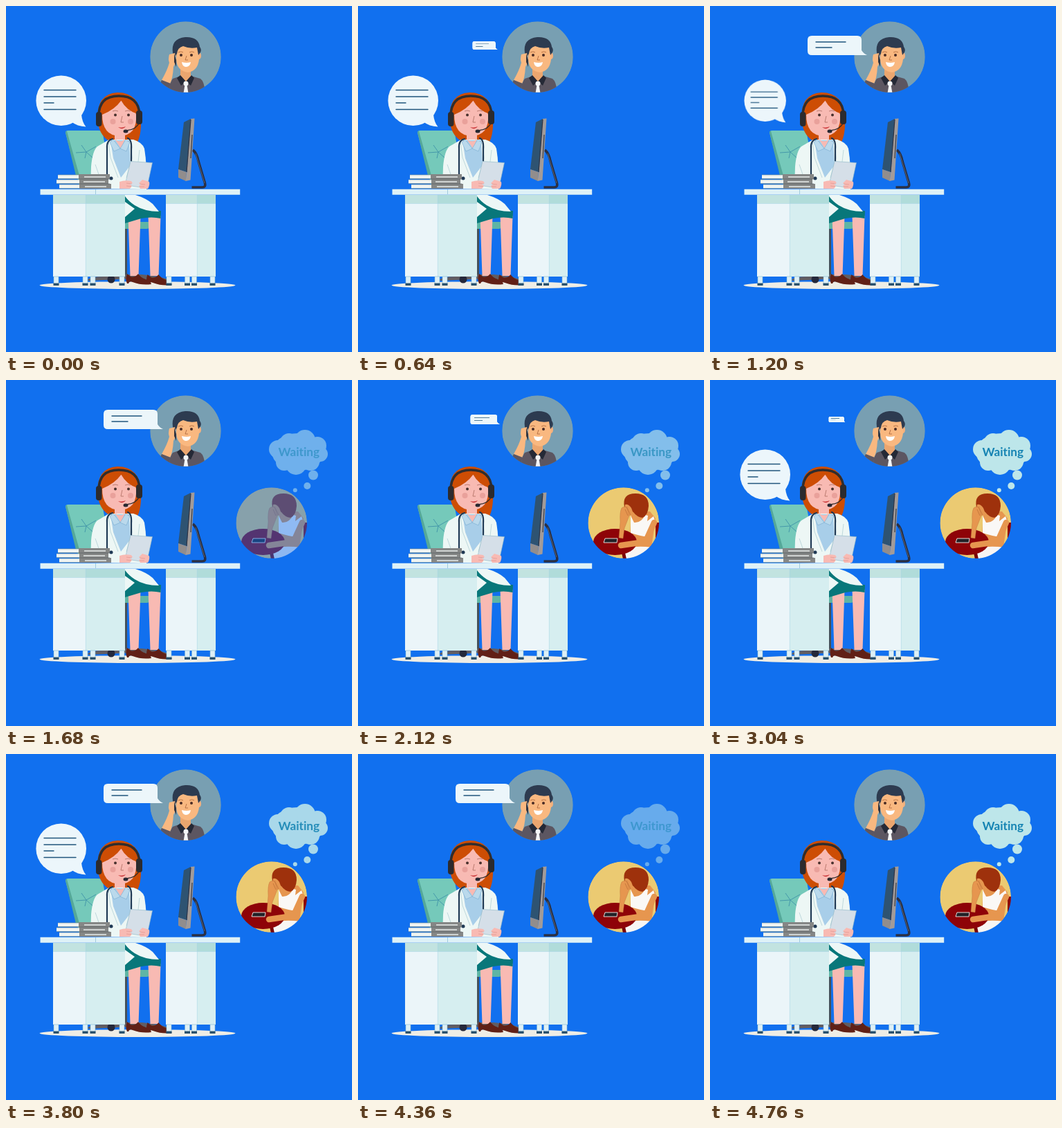
An HTML page for the animation above (4840 ms loop, 500 px wide and 500 px high).

```html
<!DOCTYPE html>
<html lang="en">
<head>
<meta charset="utf-8">
<title>Online consultation</title>
<style>
  html, body { margin: 0; width: 100%; height: 100%; overflow: hidden; background: #1170ef; }
  svg { display: block; width: 100vw; height: 100vh; }
  .anim { animation: 4840ms infinite; }
  #reply { transform-origin: 183.5px 57px; animation-name: reply; }
  #speech { transform-origin: 79.5px 137px; animation-name: speech; }
  #patient { animation-name: patient; }
  .thought { animation-name: thought; }
  .skin { fill: #f8bab3; }
  .ink { fill: none; stroke: #20557c; stroke-width: 1.4; stroke-linecap: round; }
  text { font: 700 17.2px Lato, sans-serif; font-variant-ligatures: none; fill: #1684b3; }

  @keyframes reply {
    0% { transform: scale(0); }
    10.744% { transform: scale(0); animation-timing-function: steps(7); }
    16.529% { transform: scale(1); }
    41.322% { transform: scale(1); animation-timing-function: steps(6); }
    46.281% { transform: scale(0); }
    61.157% { transform: scale(0); animation-timing-function: steps(7); }
    66.942% { transform: scale(1); }
    93.388% { transform: scale(1); animation-timing-function: steps(6); }
    98.347%, 100% { transform: scale(0); }
  }
  @keyframes speech {
    0% { transform: scale(1); }
    23.967% { transform: scale(1); animation-timing-function: steps(6); }
    28.926% { transform: scale(0); }
    46.281% { transform: scale(0); animation-timing-function: steps(6); }
    51.24% { transform: scale(1); }
    79.339% { transform: scale(1); animation-timing-function: steps(6); }
    84.298%, 100% { transform: scale(0); }
  }
  @keyframes patient {
    0% { opacity: 0; }
    29.752% { opacity: 0; animation-timing-function: steps(11); }
    38.843%, 100% { opacity: 1; }
  }
  @keyframes thought {
    0% { opacity: 0; }
    29.752% { opacity: 0; animation-timing-function: steps(11); }
    38.843% { opacity: 1; }
    41.322% { opacity: 1; animation-timing-function: steps(9); }
    48.76% { opacity: 0; animation-timing-function: steps(12); }
    58.678% { opacity: 1; }
    77.686% { opacity: 1; animation-timing-function: steps(9); }
    85.124% { opacity: 0; animation-timing-function: steps(12); }
    95.041%, 100% { opacity: 1; }
  }
</style>
</head>
<body>
<svg viewBox="0 0 500 500">
  <defs>
    <clipPath id="callerClip"><circle cx="259.5" cy="73.5" r="51.3"/></clipPath>
    <clipPath id="patientClip"><circle cx="383.7" cy="206.5" r="51.3"/></clipPath>
    <g id="foot">
      <path d="M0 391h7v11h-7z" fill="#def0f6" stroke="#7fb5d0" stroke-width=".6"/>
      <path d="M-.5 400.500h8v3.500h-8z" fill="#29516d"/>
    </g>
    <path id="shoe" d="M175 387q-3 8 0 14h2q1-4 6-2 13 5 27 3-1-5-8-7-8-3-11-8-5 6-11 4z" fill="#612016"/>
  </defs>

  <ellipse cx="190" cy="403.600" rx="141.500" ry="5.400" fill="#efede5"/>

  <g id="chair">
    <path d="M86 183q0-3 4-3h44q5 0 6 5l14 78h-47z" fill="#75c9ba"/>
    <path d="M86 183q0-3 2-2l18 64h-5z" fill="#55a899"/>
    <path d="M101 212l15-1 10 9M109 201l7 10 14-8M116 211l-2 9" fill="none" stroke="#4599aa"/>
    <path d="M165 312h43v6q0 4-5 4h-38z" fill="#5fb5a5"/>
    <path d="M171 322h4v68h-4z" fill="#45505a"/>
    <path d="M118 396q3-5 24-5l30-3h24q30 3 40 8l-2 4-50-6-64 3z" fill="#625d62"/>
    <circle cx="152" cy="395" r="5.500" fill="#25283a"/>
  </g>

  <g id="legs">
    <path class="skin" d="M176.500 303h18l-3 87h-12zM205.500 303h18l-3 87h-12z"/>
    <use href="#shoe"/><use href="#shoe" x="29.500" y="1"/>
    <path d="M172 274l13 11 20 10 19 1-.5 11q-13-3-28 0l-23.500 7z" fill="#08777a"/>
    <path d="M172 273h15q16 5 25 13l9 11q-21 0-35-9-8-5-14-13z" fill="#edf7f6"/>
    <path d="M172 283l14 10-14 12z" fill="#edf7f6"/>
  </g>

  <g id="doctor">
    <path d="M133 164q-3-37 28-39 33 0 34 38 1 27-8 38l-38-6q-16-10-16-31z" fill="#cd4d04"/>
    <path class="skin" d="M157 180h15v22h-15z"/>
    <path d="M122 264l1-32q2-23 9-29l17-10h35q13 4 16 13 4 24 3 59z" fill="#edf7f5"/>
    <path d="M151 194h27l2 36-14 18-11-28z" fill="#a8cee9"/>
    <path d="M157 192q8 7 15 0l-6 14z" class="skin"/>
    <path d="M155 193l10 13-9 4-6-13zM173 193l-8 13 9 4 5-13z" fill="#bad9ec" stroke="#6ca4ca" stroke-width=".5"/>
    <path d="M148 196l3 23 11 29M180 196l2 24-8 28M129 229l7 20M193 208l-2 17" fill="none" stroke="#aacbd0" stroke-width=".7"/>
    <path d="M154 192q-9 2-8 14v36q0 6 6 7M176 191q6 2 5 16v17" fill="none" stroke="#203a55" stroke-width="2.200" stroke-linecap="round"/>
    <circle cx="152" cy="249" r="2.500" fill="#203a55"/>
    <path class="skin" d="M139 157q3-18 24-21 22 3 25 21 2 30-24 31-25-1-25-31z"/>
    <path d="M137 161q-2-25 27-28l3 3q-10 14-28 21zM165 134q25 1 25 22-16-5-24-20z" fill="#cd4d04"/>
    <path d="M134 159q0-29 29-29t30 27" fill="none" stroke="#302d2d" stroke-width="3.400"/>
    <rect x="130" y="153" width="8.500" height="21" rx="4" fill="#2c2b2e"/>
    <rect x="188" y="151" width="9" height="20" rx="4" fill="#2c2b2e"/>
    <path d="M193 168q-5 11-19 12" fill="none" stroke="#302d2d" stroke-width="1.300"/>
    <ellipse cx="173" cy="181" rx="3.500" ry="2.500" fill="#282832"/>
    <circle cx="154.500" cy="167" r="4" fill="#e9a19b"/>
    <circle cx="180" cy="167" r="4" fill="#e9a19b"/>
    <circle cx="158" cy="157.500" r="2" fill="#48302d"/>
    <circle cx="177" cy="157.500" r="2" fill="#48302d"/>
    <path d="M154 152q4-2 8 0M172 152q4-2 8 0M168 159l-2 9h4" fill="none" stroke="#ad6b60" stroke-width=".8"/>
    <path d="M162 175q6 2 11-1-4 6-11 1z" fill="#c7292d"/>
    <path d="M180 224.500l31.500 2-8 37-31.500-5z" fill="#d5dfe8" stroke="#8cb5c4" stroke-width=".6"/>
    <path class="skin" d="M164 254q8-3 17-1l2 3-4 1 3 3-3 4h-15zM207 254l-10-3-5 5 3 2-3 2 2 4h11q3-5 2-10z"/>
    <path d="M174 256l8 1M174 260l7 1M193 257l8 1M193 261l7 0" stroke="#d98e88" stroke-width=".6"/>
  </g>

  <g id="books">
    <path d="M75 244h30v5.500h-30zM73 251h34v5.500h-34zM77 258h29v5.500h-29z" fill="#f0f4f2"/>
    <path d="M75 244h30M75 249.500h32M73 251h34M73 256.500h34M77 258h30M77 263.500h30" stroke="#688b98" stroke-width=".7"/>
    <path d="M105 243h45v7h-45zM106 250h42v7h-42zM106 257h46v7h-46z" fill="#858786"/>
    <path d="M113 247h31M112 254h31M114 261h31" stroke="#e8edeb" stroke-width="1.500"/>
    <path d="M105 250h45M106 257h44" stroke="#555d62" stroke-width=".7"/>
  </g>

  <g id="monitor">
    <path d="M270 208q6 5 8 16l9.500 32q1.500 6-4 6h-15" fill="none" stroke="#2a3045" stroke-width="3.600"/>
    <path d="M274 213l13 43" stroke="#78889a" stroke-width=".6"/>
    <path d="M257 168l10-5-6 77-12-4z" fill="#2e5372"/>
    <path d="M249 236l12 4-1 13-11-5z" fill="#918d8d"/>
    <path d="M267 163l5.500-.5-6 89-7 1.500 2-14z" fill="#a29b99"/>
    <path d="M267 164l-6 76" stroke="#303443" stroke-width="1.200"/>
    <path d="M269 186l-2 34" stroke="#3a3d47" stroke-width="1.200"/>
  </g>

  <g id="desk">
    <path d="M68 273h47v118h-47zM231 273h45v118h-45z" fill="#ebf5f9"/>
    <path d="M115 273h57v118h-57zM276 273h27v118h-27z" fill="#d6eef0"/>
    <path d="M68 273h47v12.500h-47zM231 273h45v12.500h-45z" fill="#c2e3e0"/>
    <path d="M115 273h57v12.500h-57zM276 273h27v12.500h-27z" fill="#b0dcda"/>
    <path d="M115.300 273v118M276.300 273v118M68 285.500h104M231 285.500h72" fill="none" stroke="#a6d2e4" stroke-width=".5"/>
    <use href="#foot" x="69"/><use href="#foot" x="111"/><use href="#foot" x="122"/><use href="#foot" x="164"/>
    <use href="#foot" x="232"/><use href="#foot" x="258.500"/><use href="#foot" x="268.500"/><use href="#foot" x="295"/>
    <path d="M49.500 264.800h288.700v8h-288.700z" fill="#def1f7"/>
    <path d="M129.500 265v7" stroke="#86bad2" stroke-width=".7"/>
  </g>

  <g id="caller" clip-path="url(#callerClip)">
    <circle cx="259.500" cy="73.500" r="51.300" fill="#789fb2"/>
    <path d="M236 128q-1-16 5-23l12-4h14l14 4q6 4 7 23z" fill="#5c5661"/>
    <path d="M252 88h15v15l-7 8-8-8z" fill="#eba66f"/>
    <path d="M252 100l8 9-7 6-6-11zM268 100l-8 9 7 6 5-11z" fill="#252936"/>
    <circle cx="260" cy="112" r="3.500" fill="#f3f5f7"/>
    <path d="M258.500 114h3l2 12h-7z" fill="#f3f5f7"/>
    <ellipse cx="279" cy="72" rx="3" ry="5" fill="#f4b17e"/>
    <path d="M246 62q3-8 16-8 14 0 17 9v14q-2 17-16 19-16-2-17-19z" fill="#f9b880"/>
    <path d="M241 68q-3-21 18-23 19-1 21 14 3 4 1 8l-3 4-2-11q-11 2-20-2-8 2-9 11l-3 5z" fill="#2d3b50"/>
    <path d="M236 70l8-2 2 12-4 8q-1 17-5 24l-12-5q8-14 11-25-2-5 0-12z" fill="#f9b880"/>
    <path d="M225 107l13 5-4 14-14-9z" fill="#5c5661"/>
    <path d="M243 69l3 9v10l-3-7z" fill="#303541"/>
    <circle cx="253" cy="71" r="2" fill="#4a2c25"/>
    <circle cx="268" cy="71" r="2" fill="#4a2c25"/>
    <path d="M249 67q4-2 7 0M265 67q4-2 7 0M261 72l-2 6h4" fill="none" stroke="#b16c40" stroke-width=".9"/>
    <path d="M254 81q7 2 13 0-1 7-7 7-5 0-6-7z" fill="#fff"/>
  </g>

  <g id="reply" class="anim">
    <path d="M147 43h66q6 0 6 6v15q3 5 8 7h-80q-6 0-6-6v-16q0-6 6-6z" fill="#ecf6fa"/>
    <path class="ink" d="M153 52h43M153 60h23"/>
  </g>

  <g id="speech" class="anim">
    <path d="M109 157q1 11 6.500 17.500-13-1-20-6.500z" fill="#ecf6fb"/>
    <circle cx="79.700" cy="136.700" r="36.300" fill="#ecf6fb"/>
    <path class="ink" d="M55 121.500h46M55 131h46M55 140h14M55 149.500h46"/>
  </g>

  <g id="patient" class="anim">
    <g clip-path="url(#patientClip)">
      <circle cx="383.700" cy="206.500" r="51.300" fill="#ebca72"/>
      <path d="M430 206h7v22h-7z" fill="#8e0509"/>
      <path d="M395 190h27l8 10-6 42h-32z" fill="#e6964f"/>
      <path d="M386 243q18-4 40-1l5 17h-45z" fill="#f8f5f3"/>
      <path d="M380 245h5l3 14h-5z" fill="#780308"/>
      <ellipse cx="371.500" cy="234" rx="31.500" ry="19" fill="#8e0308"/>
      <path d="M394 196l5 10q10 1 16-11l4 1-1 8 9-7q6 14-6 30-12-1-27-6z" fill="#faf8f6"/>
      <path d="M428 206l-10 22q-3 7-11 7l-27 4" fill="none" stroke="#e6964f" stroke-width="8.500" stroke-linecap="round"/>
      <path d="M385 184q-4-20 16-20 19 0 19 18-1 14-9 17-8-1-13-8z" fill="#9e310c"/>
      <path d="M386 180q5-1 9 5l3 8q-4 5-9 2-5-6-3-15z" fill="#e6964f"/>
      <path d="M381 185q5-4 8 1l3 10-7 18-2 15-6-1 2-23q-1-14 2-20z" fill="#e6964f" stroke="#b86c35" stroke-width=".4"/>
      <path d="M388 183l6 12M386 187l4 9" stroke="#b86c35" stroke-width=".7"/>
      <path d="M357 229h18l-1 6h-19z" fill="#222127" stroke="#f4efeb" stroke-width=".9"/>
    </g>
  </g>

  <g class="anim thought" fill="#bde6ea">
    <ellipse cx="422" cy="104" rx="38" ry="27"/>
    <circle cx="432" cy="87" r="15"/><circle cx="409" cy="90" r="13"/>
    <circle cx="450" cy="95" r="13"/><circle cx="393" cy="100" r="13"/>
    <circle cx="454" cy="107" r="11"/><circle cx="402" cy="119" r="12"/>
    <circle cx="419" cy="122" r="15"/><circle cx="440" cy="118" r="13"/>
    <circle cx="444" cy="137.500" r="7"/><circle cx="435.300" cy="153" r="5"/><circle cx="417.800" cy="159.300" r="3"/>
  </g>
  <text class="anim thought" x="423.300" y="110" text-anchor="middle">Waiting</text>
</svg>
</body>
</html>
```
